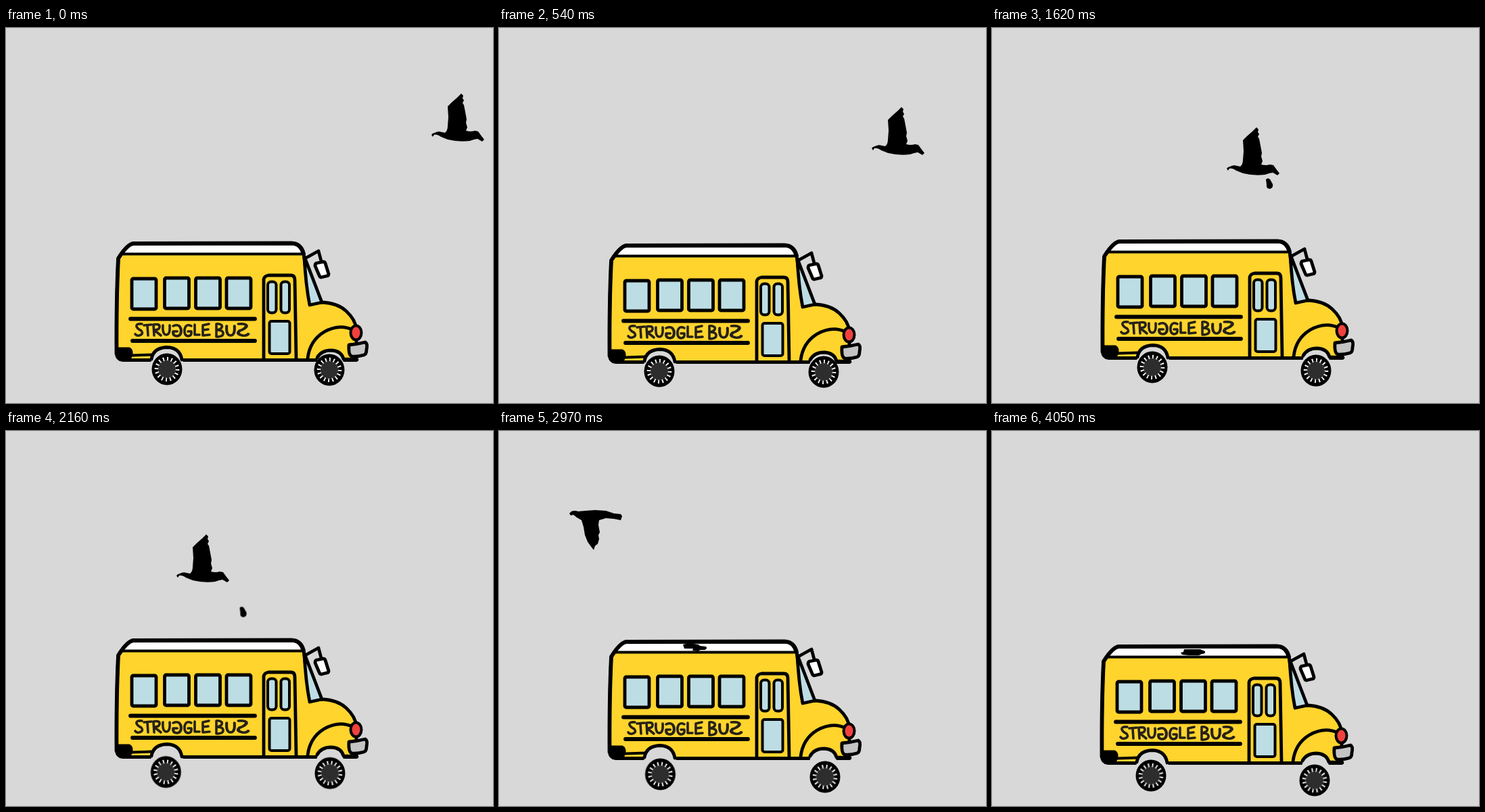
An HTML page without scripts that plays this animation: 720 px wide and 555 px high, repeating every 4.32 s.

```html
<!DOCTYPE html>
<html lang="en">
<head>
<meta charset="utf-8">
<title>Struggle bus</title>
<style>
  html, body { margin: 0; width: 100%; height: 100%; overflow: hidden; background: #d8d8d8; }
  svg { display: block; width: 100vw; height: 100vh; }

  .ink { stroke: #000; stroke-width: 4.8; stroke-linecap: round; stroke-linejoin: round; fill: none; }
  .thin { stroke-width: 4; }
  .bold { stroke-width: 5.8; }
  .paint { fill: #ffd42d; }
  .glass { fill: #bddde4; }
  .ground { fill: #d8d8d8; }
  .white { fill: #fff; }
  .chrome { fill: #c4c4c4; }
  .lamp { fill: #f0413f; }
  .letters { stroke: #262218; stroke-width: 3.6; }

  /* One loop is 16 held poses; steps() spreads them evenly between key points. */
  .move { animation: 4.32s step-end -2ms infinite; }
  .bus { animation-name: bus; }
  .rear { animation-name: rear; }
  .front { animation-name: front; }
  .bird { animation-name: fly; }
  .drop { animation-name: fall; }
  .splat { animation-name: splat; }
  .blob { animation-name: blob; }
  .spin { animation: spin 4.32s steps(16) -2ms infinite; }
  .flap { animation: flap .54s step-end -2ms infinite; }
  .flap.down { animation-delay: -272ms; }

  @keyframes bus {
    0%     { transform: none; animation-timing-function: steps(2); }
    12.5%  { transform: translate(0, 3px); animation-timing-function: steps(2); }
    25%    { transform: translate(-1px, 4px); animation-timing-function: steps(2); }
    37.5%  { transform: translate(0, -3px); animation-timing-function: steps(3); }
    56.25% { transform: translate(0, -12px); animation-timing-function: steps(2); }
    68.75% { transform: translate(0, -7px); animation-timing-function: steps(4); }
    93.75%, to { transform: translate(-1px, 0); }
  }
  @keyframes rear {
    0%     { transform: translate(238px, 505px); animation-timing-function: steps(2); }
    12.5%  { transform: translate(237px, 508px); animation-timing-function: steps(4); }
    37.5%  { transform: translate(237px, 502px); animation-timing-function: steps(3); }
    56.25% { transform: translate(236px, 506px); animation-timing-function: steps(2); }
    68.75% { transform: translate(238.500px, 508px); animation-timing-function: steps(4); }
    93.75%, to { transform: translate(235px, 510px); }
  }
  @keyframes front {
    0%     { transform: translate(478px, 506px); animation-timing-function: steps(4); }
    25%    { transform: translate(482px, 512px); animation-timing-function: steps(2); }
    37.5%  { transform: translate(479px, 507px); animation-timing-function: steps(3); }
    56.25% { transform: translate(479px, 506px); animation-timing-function: steps(2); }
    68.75% { transform: translate(482px, 512px); animation-timing-function: steps(4); }
    93.75%, to { transform: translate(477px, 517px); }
  }
  @keyframes fly {
    0%     { transform: translate(629px, 158px); animation-timing-function: steps(2); }
    12.5%  { transform: translate(551px, 178px); animation-timing-function: steps(2); }
    25%    { transform: translate(473px, 188px); animation-timing-function: steps(2); }
    37.5%  { transform: translate(347px, 208px); animation-timing-function: steps(2); }
    50%    { transform: translate(252px, 214px); }
    56.25% { transform: translate(204px, 158px); }
    62.5%  { transform: translate(143px, 164px); }
    68.75% { transform: translate(104px, 122px); animation-timing-function: steps(3); }
    87.5%  { transform: translate(-13px, 106px); }
    93.75%, to { transform: translate(-100px, 106px); }
  }
  @keyframes fall {
    0%    { visibility: hidden; }
    37.5% { visibility: visible; transform: translate(404px, 222px); animation-timing-function: steps(4); }
    62.5%, to { visibility: hidden; transform: translate(285px, 297px); }
  }
  @keyframes splat { 0%, 81.25%, to { visibility: hidden; } 62.5% { visibility: visible; } }
  @keyframes blob { 0% { visibility: hidden; } 81.25%, to { visibility: visible; } }
  @keyframes flap { 0% { visibility: visible; } 50%, to { visibility: hidden; } }
  @keyframes spin { to { transform: rotate(96deg); } }
</style>
</head>
<body>
<svg viewBox="0 0 720 555" role="img" aria-label="Struggle bus">
  <defs>
    <g id="wheel">
      <ellipse rx="22.500" ry="23.500"/>
      <g class="spin">
        <circle r="14" fill="#2d2d2d"/>
        <circle r="15.500" fill="none" stroke="#f4f4f4" stroke-width="5.500" pathLength="96" stroke-dasharray="1.9 4.1"/>
      </g>
    </g>
    <rect id="window" x="-18" y="370" width="36" height="45" rx="2"/>
    <rect id="pane" y="375.500" width="12.500" height="46" rx="5"/>
    <path id="S" d="M5-8Q-4-9-3-4Q-1 0 4 2Q8 7 1 9Q-3 10-5 7"/>
    <path id="U" d="M-5-7Q-6 7 0 7Q6 7 5-7"/>
    <path id="G" d="M5-7Q-3-11-5-2Q-6 8 1 8Q6 7 5 1H0"/>
  </defs>

  <g class="move bus">
    <g class="ink">
      <!-- mirror -->
      <path d="M444 340L462 330L466 345"/>
      <path class="white" d="M459 348L469 346Q471 346 472 348L477 364Q477 367 474 367L466 369Q464 369 463 366L457 352Q457 349 459 348Z"/>

      <!-- shell, windscreen, roof -->
      <path class="paint" d="M163.500 482Q163 400 166 341Q180 319 189 319L422 318.500Q436 319 440 334L449 408L468 406Q490 407 503 419Q517 432 518 446V491.500H172Q164 490 163.500 482Z"/>
      <path class="glass" d="M441 338L467 406L449 410Q443 380 441 338Z"/>
      <path class="white thin" d="M170 334.500Q179 320 190 319.500H424Q435 320 439 334.500Z"/>
      <path class="bold" d="M163.500 482Q163 400 166 341Q180 319 189 319L422 318.500Q436 319 440 334"/>

      <!-- windows, stripes, door -->
      <g class="glass">
        <use href="#window" x="204" y="1"/>
        <use href="#window" x="252.500"/>
        <use href="#window" x="298.500"/>
        <use href="#window" x="344"/>
      </g>
      <path class="bold" d="M184 430.500H368M187 463H368"/>
      <path d="M381 489V372Q382 367 388 366H421Q427 366 427 373L429 489"/>
      <g class="glass thin">
        <use href="#pane" x="387"/>
        <use href="#pane" x="406.500"/>
        <rect x="389.500" y="434" width="30" height="48" rx="3"/>
      </g>

      <!-- fender, arches, bumpers, lamp -->
      <path d="M446 489Q449 463 470 450Q493 437 513 447"/>
      <path class="thin" d="M187 484.500L216 483.500"/>
      <path fill="#000" d="M166 475H182Q186 477 185 484L182 490H172Q166 489 166 475Z"/>
      <path class="ground" stroke="none" d="M214 496Q217 473 238 472Q259 473 262 496ZM459 496Q463 477 480 477Q497 477 499 496Z"/>
      <path d="M215 490Q218 473 238 472.500Q257 473 260 491M460 488Q466 477 481 477Q496 478 499 490L519 491"/>
      <path class="chrome" d="M507 469Q520 468 531 465Q535 467 533 476Q533 483 529 484Q519 487 511 486Q506 484 507 469Z"/>
      <ellipse class="lamp thin" cx="517.500" cy="451" rx="8" ry="10.500"/>
    </g>

    <g class="ink letters">
      <use href="#S" transform="translate(196 446)"/>
      <path d="M204 440L215 439M209 440L210 455M219 455L218 439Q228 437 227 443Q226 447 219 447L229 455"/>
      <use href="#U" transform="translate(237 447)"/>
      <use href="#G" transform="translate(253 448) scale(-1.15 1)"/>
      <use href="#G" transform="translate(269 448)"/>
      <path d="M279 439V454H286M300 438L291 440V455L301 454M291 447L299 446"/>
      <path d="M311 438V457Q322 457 321 451Q320 447 312 447Q321 445 319 440Q316 437 311 438"/>
      <use href="#U" transform="translate(332 448) scale(1.15 1)"/>
      <use href="#S" transform="translate(351 446) scale(-1.4 1)"/>
    </g>

    <path class="move splat" d="M272 323L281 321L295 323L297 325L306 326Q309 329 304 331H298L294 333L286 332L287 329L274 329Z"/>
    <path class="move blob" d="M285 323H309L311 324L316 326Q317 330 311 330L307 332H292L282 331L280 328L284 327Z"/>
  </g>

  <g class="move rear"><use href="#wheel"/></g>
  <g class="move front"><use href="#wheel"/></g>

  <path class="move drop" d="M1 2Q4-1 7 2L11 9Q12 15 7 16Q1 16 2 10Z"/>

  <!-- both wing poses share the beak as origin -->
  <g class="move bird">
    <path class="flap" transform="translate(0 -61)" d="M0 61L2 59L5 58Q10 55 15 57L20 58Q24 55 24 48L25 35L24 19L30 13L38 6L44 0L47 3L46 7L48 10L46 14L48 17L49 22L52 38L51 43L53 50L51 55Q58 57 64 55L69 56L74 63L78 68L75 71L68 67Q62 68 57 70Q40 72 24 68L14 64Q8 60 4 61L2 64Z"/>
    <path class="flap down" transform="translate(0 -5)" d="M0 5L3 2Q8 0 13 2L24 1L38 0L54 1L66 5L76 6L78 9L76 15L66 13L54 12L44 15L43 22L45 33L43 37L44 43L42 50L38 53L36 59L32 54L27 47L23 37L21 25L18 15L11 11L6 7L2 8Z"/>
  </g>
</svg>
</body>
</html>
```
